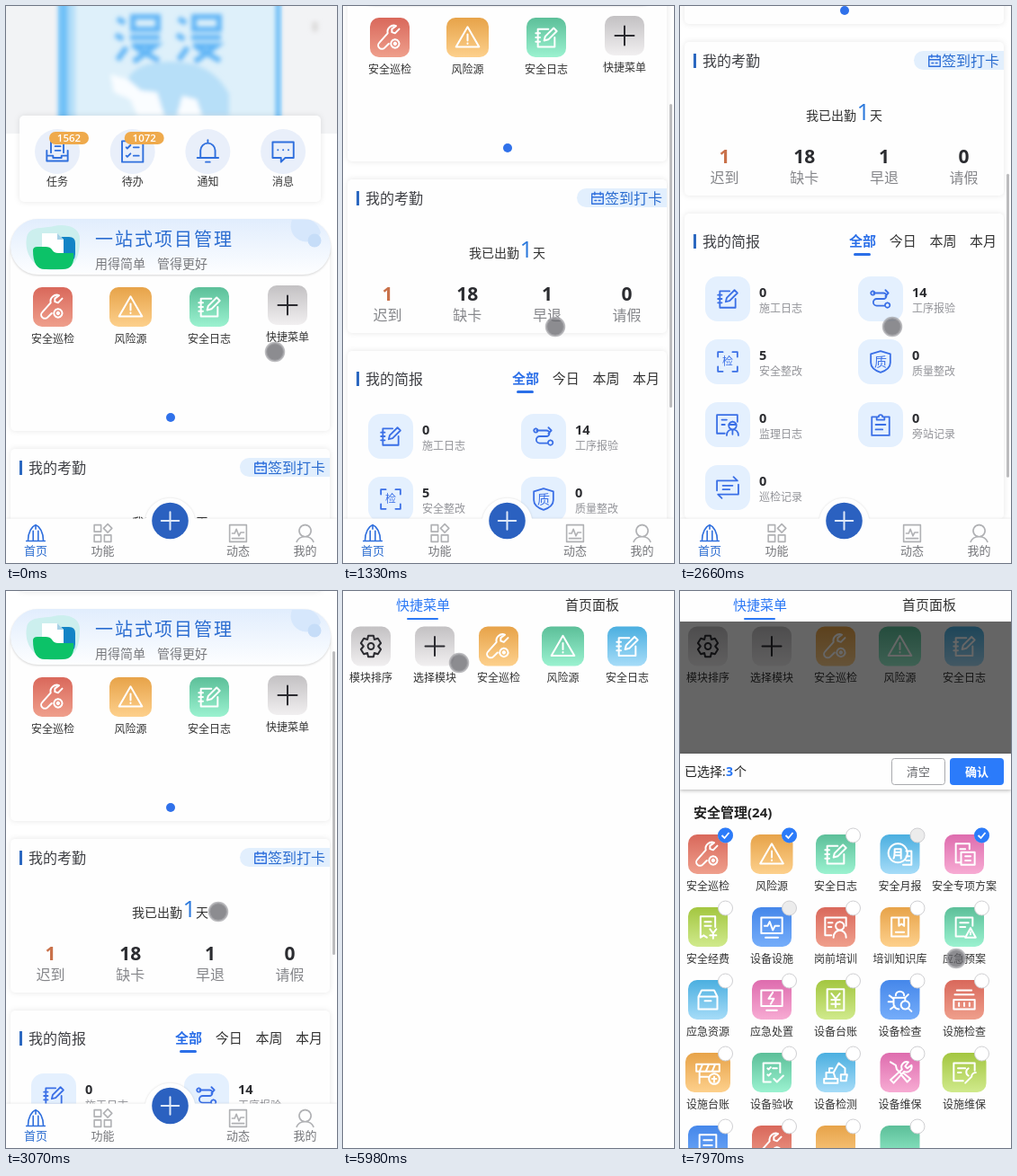
An HTML page that plays this animation: 368 by 620 pixels, repeating every 8000 ms.

```html
<!DOCTYPE html>
<html lang="zh-CN">
<head>
<meta charset="utf-8">
<title>首页与快捷菜单</title>
<style>
html, body { margin: 0; width: 100%; height: 100%; overflow: hidden; background: #fff; }
svg { display: block; width: 368px; height: 620px; }
text { font-family: 'Open Sans', 'Noto Sans CJK SC', 'Noto Sans CJK', sans-serif; }
.card { fill: #fefefe; filter: drop-shadow(0 0 3px rgba(0, 0, 0, .1)); }
.bar { filter: drop-shadow(0 0 1px rgba(0, 0, 0, .14)); }
.head { filter: drop-shadow(0 1px 2px rgba(0, 0, 0, .3)); }
</style>
</head>
<body>
<svg id="stage" viewBox="0 0 368 620"></svg>
<script>
const LOOP = 8000;
const BLUE = '#2f6fdd', INK = '#333', GREY = '#85868a';

const TINTS = {
  red: ['#d9685b', '#ef9f8c'], orange: ['#e7a349', '#fdd08c'], green: ['#5cbf99', '#9bf2d0'],
  sky: ['#4bafe0', '#a6dcf8'], pink: ['#de6cae', '#f7abd3'], lime: ['#a3c640', '#d0ea8c'],
  blue: ['#4587ea', '#75adfa'], grey: ['#c3c1c3', '#f1eff0']
};

// Line icons on a 24 unit grid
const ICONS = {
  wrench: 'M21 4l-4 4-3-1v-3l4-3a6 6 0 0 0-8 7L2 17a3 3 0 0 0 5 5l4-4M17 14a4 4 0 1 0 .1 0M17 17a1 1 0 1 0 .1 0',
  warn: 'M12 2L23 21H1ZM12 9v6M12 17.5v.5',
  log: 'M20 12v9H4V4h10M2 8h4M2 12h4M2 16h4M10 15l1-4 8-8 3 3-8 8z',
  plus: 'M12 3v18M3 12h18',
  gear: 'M9.5 2h5l.8 3.5 3.4-1 2.8 4.5-2.5 3 2.5 3-2.8 4.5-3.4-1-.8 3.5h-5l-.8-3.5-3.4 1L2.5 15 5 12 2.5 9l2.8-4.5 3.4 1zM12 9a3 3 0 1 0 .1 0',
  month: 'M10 2a9 9 0 1 0 .1 0M18 9h5v13H15M18 14h3M18 18h3M6 16c1-2 1-4 1-9h6v9M7 10h6M7 13h6',
  plan: 'M8 20H4V2h13v5M8 7h5M9 10h13v12H9zM13 14h5M13 18h5',
  fund: 'M19 12V2H5v20l3-2 3 2M9 7h6M9 11h6M14 14l3 4 3-4M17 18v5M14 20h6',
  pulse: 'M2 3h20v15H2zM6 22h12M5 11h3l2-4 3 8 2-4h4',
  train: 'M8 20H2V3h20v8M16 7a4 4 0 1 0 .1 0M10 22c0-9 12-9 12 0M5 8h4M5 12h3',
  book: 'M4 3h16v18H4zM11 3v8l2.5-2 2.5 2V3M8 17h8',
  alert: 'M12 21H4V3h16v8M8 8h8M8 12h5M18 13l5 9H13zM18 17v2',
  box: 'M3 9l3-6h12l3 6v12H3zM3 9h18M9 13h6',
  bolt: 'M2 3h20v15H2zM7 22h10M13 5l-4 6h5l-3 5',
  ledger: 'M4 2h16v20H4zM8 6l4 5 4-5M12 11v8M8 12h8M8 16h8',
  bug: 'M8 8a4 4 0 0 1 8 0M17 12v-2H6v6a5 5 0 0 0 5 5M2 8l4 3M1 14h5M3 21l4-3M20 7l-3 3M17 13a4 4 0 1 0 .1 0M20 20l3 3',
  fence: 'M5 3h14M3 7h18M2 12h20v9H2zM7 15v3M12 15v3M17 15v3',
  barrier: 'M1 4h22v7H1zM7 4l-3 7M13 4l-3 7M19 4l-3 7M4 11v11M4 16h8M18 13a5 5 0 1 0 .1 0M18 16v5M16 18h4',
  accept: 'M11 21H4V3h16v9M8 8l1 1 2-2M13 8h4M8 14l1 1 2-2M14 18l3 3 6-6',
  digger: 'M1 18h13v4H1zM3 18v-6h7l2 6M6 12V8h3M10 12l5-9 6 5v6M17 14h6l-1 6h-5z',
  tools: 'M3 2l5 3 1 4 4 4M14 15l5 6 3-3-6-5M3 19L14 9a5 5 0 0 1 6-7l-3 4 2 2 4-3a5 5 0 0 1-7 6L6 22z',
  fix: 'M22 10V3H2v17h9M6 8h7M6 12h3M13 22l6-6a4 4 0 0 1 4-4M16 8a4 4 0 0 0 0 7',
  sheet: 'M4 2h16v20H4zM8 7h8M8 12h8M8 17h5',
  tray: 'M6 13V3h12v10M2 11v10h20V11M2 16h6v2h8v-2h6M10 7h5M10 11h5',
  todo: 'M2 2h20v20H2zM6 8l1 1 3-3M6 16l1 1 3-3M13 8h5M13 16h5',
  bell: 'M12 1v3M5 18v-7a7 7 0 0 1 14 0v7M2 18h20M10 22h4',
  chat: 'M2 3h20v15h-8l-4 4v-4H2zM7 10.500h.1M12 10.500h.1M17 10.500h.1',
  route: 'M5 6h10a3 3 0 0 1 0 6H8a3 3 0 0 0 0 7h8M4 4a2 2 0 1 0 .1 0M19 16a2.500 2.500 0 1 0 .1 0M17 3l3 3-3 3',
  scan: 'M2 7V2h5M17 2h5v5M2 17v5h5M17 22h5v-5',
  shield: 'M12 1l10 3v9c0 5-4 8-10 10C6 21 2 18 2 13V4z',
  inspect: 'M9 21H1V2h21v7M6 7h5M6 12h3M17 9a4 4 0 1 0 .1 0M13 12h8M11 23c0-8 12-8 12 0M17 18v4',
  clip: 'M8 4H3v19h18V4h-5M8 7V4h2a2 2 0 0 1 4 0h2v3zM7 12h10M7 17h7',
  loop: 'M1 15V5h21l-4-4M23 9v10H2l4 4M7 10h10M7 14h7',
  calendar: 'M2 4h20v18H2zM2 10h20M7 1v5M17 1v5M7 16h3M14 16h3',
  home: 'M1 21h22M3 20c0-9 4-16 9-18 5 2 9 9 9 18M9 20V9M15 20V9M12 2v5',
  apps: 'M2 2h8v8H2zM13 6l5-5 5 5-5 5zM2 14h8v8H2zM14 14h8v8h-8z',
  trend: 'M2 2h20v20H2zM5 12h3l2-5 3 8 2-4h4M5 18h14',
  user: 'M12 2a7 7 0 1 0 .1 0M2 22c2-5 6-6 10-6s8 1 10 6'
};

const rect = (x, y, w, h, r, fill, more = '') =>
  `<rect x="${x}" y="${y}" width="${w}" height="${h}" rx="${r}" fill="${fill}" ${more}/>`;
const disc = (x, y, r, fill, more = '') => `<circle cx="${x}" cy="${y}" r="${r}" fill="${fill}" ${more}/>`;
const card = (x, y, w, h, r = 5) => `<rect class="card" x="${x}" y="${y}" width="${w}" height="${h}" rx="${r}"/>`;
const icon = (name, x, y, size, color, line = 2) =>
  `<path d="${ICONS[name]}" transform="translate(${x - size / 2} ${y - size / 2}) scale(${size / 24})"
    fill="none" stroke="${color}" stroke-width="${line * 24 / size}" stroke-linecap="round" stroke-linejoin="round"/>`;
// y is the visual middle of the line
const text = (x, y, size, str, fill = INK, more = '') =>
  `<text x="${x}" y="${y + size * .37}" font-size="${size}" fill="${fill}" ${more}>${str}</text>`;
const MID = 'text-anchor="middle"', BOLD = 'font-weight="700"', MEDIUM = 'font-weight="500"';
const label = (x, y, size, str, fill, more = '') => text(x, y, size, str, fill, MID + ' ' + more);

function tile(x, top, tint, name, title, w = 44) {
  return rect(x - w / 2, top, w, 44, 10, `url(#${tint})`) +
    (name ? icon(name, x, top + 22, 28, tint === 'grey' ? '#2b2b30' : '#fff') : '') +
    label(x, top + 57.500, 12, title);
}

const defs = '<defs>' + Object.entries(TINTS).map(([id, [a, b]]) =>
  `<linearGradient id="${id}" x2="0" y2="1"><stop stop-color="${a}"/><stop offset="1" stop-color="${b}"/></linearGradient>`).join('') +
  `<linearGradient id="hero" x2="0" y2="1"><stop stop-color="#e1edfd"/><stop offset="1" stop-color="#fdfeff"/></linearGradient>
   <filter id="soft"><feGaussianBlur stdDeviation="2.500"/></filter></defs>`;

function banner() {
  const strokes = x => `<path d="M${x} 14l8 5M${x - 2} 32l8 5M${x} 60l10-14M${x + 17} 12h28v14h-28zM${x + 14} 35h33M${x + 16} 44h26l-24 18M${x + 20} 46l26 15"
    fill="none" stroke="#62b6f6" stroke-width="6"/>`;
  return rect(0, 0, 368, 142, 0, '#f2f3f5') + rect(58, -10, 249, 152, 0, '#def0fa') +
    `<g filter="url(#soft)">` +
    rect(58, -10, 11, 152, 0, '#71c1f7') + rect(69, -10, 8, 152, 0, '#b4def8') + rect(300, -10, 5, 152, 0, '#5fb6f5') +
    `<path d="M134 86c4-16 20-24 50-24 34 0 52 14 64 36v24H160z" fill="#b7dff8"/>
     <path d="M116 76l20 6 14 12 18 2 8 26h-30l-8-18-18-8zM190 122l6-22 16 4 6 18z" fill="#fafdff"/>` +
    strokes(124) + strokes(192) + rect(340, 17, 7, 12, 3, '#dedddd') + '</g>';
}

function shortcuts() {
  const list = [['tray', '任务', 1562], ['todo', '待办', 1072], ['bell', '通知'], ['chat', '消息']];
  return card(15, 122, 335, 96) + list.map(([name, title, n], i) => {
    const x = 57 + i * 83.700;
    return disc(x, 162, 25, '#e9effa') + icon(name, x, 162, 28, BLUE, 1.900) + label(x, 195.500, 12, title) +
      (n ? rect(x - 9, 140, 44, 14, 7, '#efaa4c') + label(x + 13, 147, 11.500, n, '#fff', 'font-weight="600"') : '');
  }).join('');
}

function hero() {
  return card(5, 270, 355, 203) +
    `<rect x="5" y="237" width="356" height="62" rx="31" fill="url(#hero)" style="filter:drop-shadow(0 1px 1px rgba(0,0,0,.16))"/>` +
    `<path d="M318 238h20q9 4 12 14a17 17 0 0 1-32-14z" fill="#d6e7fc"/>` + disc(343, 261, 7.500, '#c6ddf8') +
    `<path d="M23 258c2-14 20-10 30-13 12-3 29 0 29 14 0 16-2 35-28 35-24 0-34-20-31-36z" fill="#ccefee"/>
     <path d="M48 257h22q7 0 7 7v12q0 10-10 10H48z" fill="#1284c6"/>
     <path d="M40 253h17l7 7v16H40z" fill="#fff"/><path d="M57 253v7h7z" fill="#a5d0e6"/>
     <path d="M30 272q0-4 5-4h9q5 0 7 3 2 4 7 4h17q2 18-12 18H43q-13 0-13-21z" fill="#0cc268"/>` +
    text(99, 260, 20, '一站式项目管理', '#2a6cd0', 'letter-spacing="2"') +
    text(99, 287, 14, '用得简单', '#77787c') + text(168, 287, 14, '管得更好', '#77787c') +
    tile(52, 313, 'red', 'wrench', '安全巡检') + tile(138.500, 313, 'orange', 'warn', '风险源', 47) +
    tile(226, 313, 'green', 'log', '安全日志') + tile(313, 311, 'grey', 'plus', '快捷菜单') +
    disc(183, 458, 5, '#3071ea');
}

const heading = (y, str) => rect(15, y - 8, 3, 16, 0, '#2c68c0') + text(25, y, 16, str, '#3f4045');

function attendance() {
  const list = [[1, '迟到'], [18, '缺卡'], [1, '早退'], [0, '请假']];
  return card(5, 493, 355, 171) + heading(514, '我的考勤') +
    '<path d="M360 503H270.500a10.500 10.500 0 0 0 0 21H360z" fill="#e2effd"/>' +
    icon('calendar', 283, 514, 15, BLUE, 1.400) + text(291, 514, 16, '签到打卡', '#2a6cd0') +
    text(140, 575, 14, '我已出勤') + text(196.500, 570, 26, 1, '#2a78dc') + text(211, 575, 14, '天') +
    list.map(([n, title], i) => {
      const x = 49.500 + i * 88.700;
      return label(x, 620.500, 21, n, i ? '#2b2c30' : '#c9714a', BOLD) + label(x, 644, 16, title, GREY);
    }).join('');
}

function briefing() {
  const list = [['log', 0, '施工日志'], ['route', 14, '工序报验'], ['scan', 5, '安全整改', '检'], ['shield', 0, '质量整改', '质'],
    ['inspect', 0, '监理日志'], ['clip', 0, '旁站记录'], ['loop', 0, '巡检记录']];
  return card(5, 684, 355, 340) + heading(715, '我的简报') +
    ['全部', '今日', '本周', '本月'].map((s, i) =>
      text(188 + i * 44.700, 714, 15, s, i ? INK : '#2b6fe8', i ? '' : BOLD)).join('') +
    rect(193, 728, 19, 3, 1.500, '#2b6fe8') +
    list.map(([name, n, title, sign], i) => {
      const x = 28 + i % 2 * 170, y = 754 + (i >> 1) * 70;
      return rect(x, y, 50, 50, 14, '#e4f0fe') + icon(name, x + 25, y + 25, 26, '#3a6fe6', 1.800) +
        (sign ? label(x + 25, y + 25, name === 'scan' ? 12 : 14, sign, '#3a6fe6') : '') +
        text(x + 60, y + 17.500, 14.500, n, '#2b2c30', BOLD) + text(x + 60, y + 36, 12, title, '#929398');
    }).join('');
}

function adder() {
  return card(5, 1039, 355, 126) +
    disc(182.500, 1091.500, 22.500, 'none', 'stroke="#0b66cd" stroke-width="5"') +
    icon('plus', 182.500, 1091.500, 22, '#0b66cd', 5) + label(182.500, 1133, 15, '添加', '#0b66cd');
}

function tabBar() {
  const list = [['home', '首页', 33], ['apps', '功能', 107.500], ['trend', '动态', 258], ['user', '我的', 332.500]];
  return `<path class="bar" d="M0 570.500H155A28 28 0 0 1 210 570.500H368V621H0z" fill="#fefefe"/>` +
    disc(182.500, 573, 20.300, '#2b61c0') + icon('plus', 182.500, 573, 26, '#dfe9f8', 2) +
    list.map(([name, title, x], i) => icon(name, x, 587, 22.500, i ? '#b0b1b4' : BLUE, 1.600) +
      label(x, 606, 13, title, i ? '#77787c' : '#2a6cd0')).join('');
}

const COLS = [31, 102, 173, 244.500, 316];

function menuPage() {
  const list = [['grey', 'gear', '模块排序'], ['grey', 'plus', '选择模块'], ['orange', 'wrench', '安全巡检'],
    ['green', 'warn', '风险源', 47], ['sky', 'log', '安全日志']];
  return rect(0, 0, 368, 620, 0, '#fefefe') + text(59, 15.500, 15, '快捷菜单', '#2b78f5', MEDIUM) +
    text(247, 15.500, 15, '首页面板', INK, MEDIUM) + rect(71, 30, 35, 2, 1, '#2b78f5') +
    list.map(([tint, name, title, w], i) => tile(COLS[i], 39.500, tint, name, title, w)).join('');
}

const MODULES = `red wrench 安全巡检|orange warn 风险源 47|green log 安全日志|sky month 安全月报|pink plan 安全专项方案
lime fund 安全经费|blue pulse 设备设施|red train 岗前培训|orange book 培训知识库|green alert 应急预案
sky box 应急资源|pink bolt 应急处置|lime ledger 设备台账|blue bug 设备检查|red fence 设施检查
orange barrier 设施台账 50|green accept 设备验收|sky digger 设备检测|pink tools 设备维保|lime fix 设施维保 49
blue sheet 安全交底|red wrench 设施巡检|orange  质量台账|green  质量日志`.split(/[|\n]/).map(s => s.split(' '));

function picker() {
  return rect(0, 181, 368, 440, 0, '#fefefe') + rect(0, 181, 368, 40, 0, '#fefefe', 'class="head"') +
    text(5, 201, 14, '已选择:', '#222', MEDIUM) + `<g id="count">${text(51, 201, 14, '3', '#2b78f5', BOLD)}</g>` +
    text(60, 201, 14, '个', '#222', MEDIUM) +
    rect(235.500, 186.500, 59, 29, 3, '#fff', 'stroke="#a9aaae"') + label(265, 201.500, 13, '清空', '#66676b') +
    rect(300, 186, 60, 30, 4, '#2b7bfa') + label(330, 201.500, 13, '确认', '#fff', BOLD) +
    text(15, 246.500, 15, '安全管理(24)', '#222', BOLD) +
    MODULES.map(([tint, name, title, w], i) => {
      const x = COLS[i % 5], y = 271 + Math.floor(i / 5) * 81, cx = x + 19.500, cy = y + 1;
      const locked = i === 3 || i === 6;
      return tile(x, y, tint, name, title, +w || 44) +
        disc(cx, cy, 8, locked ? '#ececec' : '#fff', 'stroke="#cfcfd2"') +
        (i < 3 || i === 4 ? `<g id="tick${i}">${disc(cx, cy, 8.500, '#2b7bfa')}
          <path d="M${cx - 4} ${cy}l3 3 5-6" fill="none" stroke="#fff" stroke-width="1.800"/></g>` : '');
    }).join('');
}

document.getElementById('stage').innerHTML = defs +
  rect(0, 0, 368, 620, 0, '#fff') +
  `<g id="home"><g id="feed">${banner() + shortcuts() + hero() + attendance() + briefing() + adder()}</g>${tabBar()}
   <rect id="thumb" x="363" width="3" height="338" rx="1.500" fill="#bcbcbe"/></g>
   <g id="menu">${menuPage()}<rect id="shade" y="34" width="368" height="586"/><g id="picker">${picker()}</g></g>
   <circle id="pointer" r="10" stroke-width="2.500"/>`;

const el = id => document.getElementById(id);
const show = (id, on) => el(id).setAttribute('display', on ? 'inline' : 'none');
const move = (id, y) => el(id).setAttribute('transform', `translate(0 ${y})`);

const TICK = 133, LEAD = 24;
const SCROLL = [[5, 0], [6, 15], [7, 60], [10, 300], [13, 525], [14, 582], [15, 619], [17, 619], [18, 598],
  [19, 540], [22, 280], [23, 217], [24, 175], [25, 145], [26, 127], [27, 118]];
// tick, x, y, pressed
const POINTER = [[0, 299, 385], [2, 262, 368], [3, 236, 357], [33, 311, 222, 1], [37, 305, 227], [38, 271, 232],
  [39, 190, 155], [40, 115, 80], [41, 72, 32], [42, 82, 54], [43, 93, 71], [45, 129, 80], [46, 129, 80, 1],
  [48, 129, 80], [50, 145, 140], [51, 166, 215], [52, 186, 268], [53, 194, 284, 1], [54, 216, 288], [55, 255, 292],
  [56, 295, 295], [57, 325, 296], [58, 341, 296, 1], [59, 341, 296], [60, 307, 409]];

function along(keys, k) {
  const i = keys.findIndex(p => p[0] > k);
  if (i === 0) return keys[0][1];
  if (i < 0) return keys[keys.length - 1][1];
  const [a, from] = keys[i - 1], [b, to] = keys[i];
  return Math.round(from + (to - from) * (k - a) / (b - a));
}

function draw(k) {
  const scroll = along(SCROLL, k);
  const onMenu = k >= 34;
  show('home', !onMenu);
  show('menu', onMenu);
  move('feed', -scroll);
  el('thumb').setAttribute('y', scroll * .507 - 43);
  el('thumb').setAttribute('opacity', k < 6 || k > 28 ? 0 : k === 28 ? .5 : 1);

  const p = Math.min(1, Math.max(0, (k - 45) / 4));
  const open = 1 - (1 - p) ** 2;
  el('shade').setAttribute('opacity', .6 * open);
  show('picker', p > 0);
  move('picker', 440 * (1 - open));
  show('tick2', k < 55);
  show('tick4', k >= 59);
  el('count').firstChild.textContent = k >= 55 && k < 59 ? 2 : 3;

  const [, cx, cy, down] = POINTER.filter(q => q[0] <= k).pop();
  const look = down
    ? { fill: 'rgba(176,172,30,.72)', stroke: 'rgba(218,214,80,.75)' }
    : { fill: 'rgba(100,100,105,.74)', stroke: 'rgba(165,165,170,.75)' };
  for (const [key, value] of Object.entries({ cx, cy, ...look })) el('pointer').setAttribute(key, value);
}

const start = performance.now();
let last = -1;
function loop() {
  const k = Math.floor(((performance.now() - start) % LOOP + LEAD) / TICK);
  if (k !== last) draw(last = k);
  requestAnimationFrame(loop);
}
loop();
</script>
</body>
</html>
```
